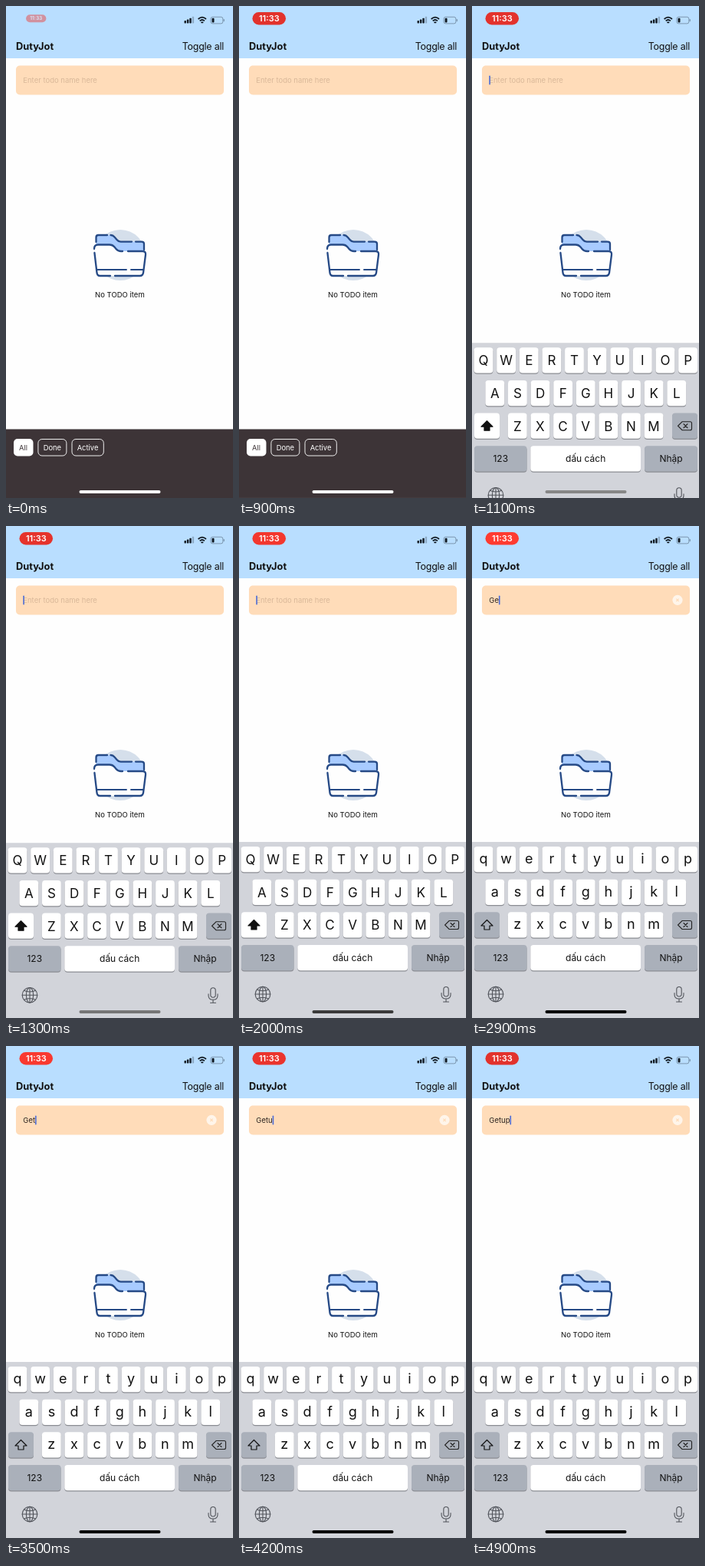
An HTML page that plays this animation: 296 by 640 pixels, repeating every 5000 ms.

```html
<!DOCTYPE html>
<html lang="en">
<head>
<meta charset="utf-8">
<title>Todo list</title>
<style>
  html, body { margin: 0; width: 100%; height: 100%; overflow: hidden; background: #fefefe; }
  svg { display: block; width: 296px; height: 640px; }
  text { font-family: Inter, Roboto, sans-serif; fill: #111; }
  .small { font-size: 9.5px; }
  .tab { font-size: 9.4px; text-anchor: middle; fill: #fff; }
  .mid { text-anchor: middle; }
  .ink { fill: none; stroke: #264a86; stroke-width: 2.3; stroke-linecap: round; stroke-linejoin: round; }
  .line { fill: none; stroke: #50535a; stroke-width: 1.1; stroke-linecap: round; }
</style>
</head>
<body>
<svg viewBox="0 0 296 640">
  <rect width="296" height="640" fill="#fefefe"/>
  <rect width="296" height="68" fill="#b9deff"/>

  <!-- status bar -->
  <g id="pill">
    <rect id="pillBox" x="17.5" y="8" width="43.5" height="16.5" rx="8.2"/>
    <text x="39.3" y="20" class="mid" font-size="11" font-weight="600" style="fill:#fff">11:33</text>
  </g>
  <g fill="#101820">
    <rect x="232.5" y="19" width="2.4" height="3.5" rx=".7"/>
    <rect x="235.9" y="17.5" width="2.4" height="5" rx=".7"/>
    <rect x="239.3" y="15.8" width="2.4" height="6.7" rx=".7"/>
    <rect x="242.7" y="13.8" width="2.4" height="8.7" rx=".7" opacity=".25"/>
    <rect x="268.5" y="15.8" width="3" height="5.6" rx="1"/>
    <rect x="283.6" y="17" width="1.2" height="3.2" rx=".6" opacity=".4"/>
  </g>
  <rect x="267" y="14.3" width="15.8" height="8.6" rx="2.4" fill="none" stroke="#101820" stroke-opacity=".4" stroke-width=".9"/>
  <g fill="none" stroke="#101820" stroke-width="1.7">
    <path d="M250.6 17q5.2-4.6 10.4 0M252.7 19.3q3.1-2.6 6.2 0"/>
    <path d="M255 21.3h1.6" stroke-linecap="round"/>
  </g>

  <!-- header and input -->
  <text x="13" y="56.5" font-size="12.8" font-weight="700">DutyJot</text>
  <text x="284" y="56.5" font-size="12.4" letter-spacing="-.2" text-anchor="end">Toggle all</text>
  <rect x="13" y="77.5" width="271" height="38" rx="5" fill="#ffdcb9"/>
  <text id="hint" class="small" x="22.3" y="100" style="fill:#d9b899">Enter todo name here</text>
  <text id="typed" class="small" x="22.3" y="100" style="fill:#2b2420"></text>
  <rect id="caret" y="90.5" width="1.6" height="12" rx=".8" fill="#4b6bd6"/>
  <g id="clear">
    <circle cx="268" cy="96.3" r="6.6" fill="#fff5ea"/>
    <path d="M266.3 94.6l3.4 3.4m0-3.4l-3.4 3.4" stroke="#ffdcb9" stroke-width="1.2"/>
  </g>

  <!-- empty folder -->
  <circle cx="149" cy="324" r="33" fill="#d5dfeb"/>
  <path d="M117.5 312V301q0-3 3-3h16q3 0 5 2.5l3 3.5q2 2.6 5 2.6h27.500q3 0 3 3V320H150z" fill="#a8cbff"/>
  <path d="M115 316q0-5.500 5-5.500h15q4 0 6.500 3l2 2.500q2.500 3 6.500 3h28q4.500 0 4 4.500l-3 23.500q-.6 4-4.500 4H122.500q-3.500 0-4-4z" fill="#fefefe"/>
  <g class="ink">
    <path d="M117.500 307V301q0-3 3-3H132M136.500 298q3 0 5 2.500l3 3.500q2 2.600 5 2.600H164M169 306.600h8q3 0 3 3V317"/>
    <path d="M115 316q0-5.500 5-5.500h15q4 0 6.500 3l2 2.500q2.500 3 6.500 3H152M159 319h19q4.500 0 4 4.500l-3 23.500q-.6 4-4.500 4H142M136 351H122.500q-3.500 0-4-4L115.400 321"/>
    <path d="M119 343H157M163 343H179" stroke-width="1.900"/>
  </g>
  <text class="small mid" x="148.400" y="379">No TODO item</text>

  <!-- filter bar -->
  <rect y="550.5" width="296" height="90" fill="#3d3437"/>
  <rect x="10" y="563" width="25.500" height="22.500" rx="5" fill="#fff"/>
  <rect x="41.900" y="563.500" width="37" height="21.500" rx="5" fill="none" stroke="#eee"/>
  <rect x="86" y="563.500" width="41.300" height="21.500" rx="5" fill="none" stroke="#eee"/>
  <text class="tab" x="22.600" y="577.700" style="fill:#3d3437">All</text>
  <text class="tab" x="60.400" y="577.700">Done</text>
  <text class="tab" x="106.500" y="577.700">Active</text>

  <g id="board">
    <rect y="411" width="296" height="260" fill="#d2d4da"/>
    <g id="keys"></g>
    <path id="shift" d="M19.500 512.500l7.500 7.500h-4v5h-7v-5h-4z" stroke="#111" stroke-width="1.200" stroke-linejoin="round"/>
    <g class="line" style="stroke:#222">
      <path d="M274 513.500h10.500q2 0 2 2v7q0 2-2 2H274l-5.500-5.500z"/>
      <path d="M276 516.500l5 5m0-5l-5 5"/>
    </g>
    <g class="line">
      <circle cx="31" cy="609" r="9.800"/>
      <ellipse cx="31" cy="609" rx="4.600" ry="9.800"/>
      <path d="M31 599.200v19.600M21.200 609h19.600M23.500 603q7.500 3.500 15 0M23.500 615q7.500-3.500 15 0"/>
      <rect x="266.800" y="599.500" width="6.400" height="12.500" rx="3.200"/>
      <path d="M264 607.500v2q0 5.500 6 5.500t6-5.500v-2M270 615v4M266.500 619h7"/>
    </g>
    <g id="bubble">
      <path fill="#fff"/>
      <text class="mid" font-size="26"></text>
    </g>
  </g>
  <rect id="home" x="95.500" y="630" width="106" height="4" rx="2"/>
</svg>
<script>
const LOOP = 5000, FOCUS = 900, HOLD = 100, PITCH = 29.62;
// time each letter lands in the field
const strokes = [['G', 2500], ['e', 2800], ['t', 3400], ['u', 4100], ['p', 4600]];
const $ = id => document.getElementById(id);
const clamp = v => Math.max(0, Math.min(1, v));
const mix = (a, b, k) => `rgb(${a.map((v, i) => Math.round(v + (b[i] - v) * k))})`;

function add(tag, attrs, content = '') {
  const el = document.createElementNS('http://www.w3.org/2000/svg', tag);
  for (const name in attrs) el.setAttribute(name, attrs[name]);
  el.textContent = content;
  return $('keys').appendChild(el);
}

function key(x, y, w, fill, label, size) {
  add('rect', { x, y: y + 1, width: w, height: 33.5, rx: 4, fill: '#8b8d93' });
  const face = add('rect', { x, y, width: w, height: 33.3, rx: 4, fill });
  const text = add('text', { x: x + w / 2, y: y + 21, class: 'mid', 'font-size': size }, label);
  return { face, text, x: x + w / 2, y };
}

const GREY = '#aab0ba', letters = {};
[['qwertyuiop', 15, 417], ['asdfghjkl', 29.8, 459.7], ['zxcvbnm', 59.3, 502.3]].forEach(([row, x, y]) =>
  [...row].forEach((c, i) => letters[c] = key(x + i * PITCH - 12.4, y, 24.8, '#fff', c, 18)));
const shiftKey = key(3, 502.3, 33, GREY, '', 12);
key(261, 502.3, 33, GREY, '', 12);
key(3, 545, 68.5, GREY, '123', 12);
key(76.3, 545, 143.7, '#fff', 'dấu cách', 12);
key(225, 545, 69, GREY, 'Nhập', 12);

function setCase(upper) {
  for (const c in letters) {
    const { text, y } = letters[c];
    text.textContent = upper ? c.toUpperCase() : c;
    text.setAttribute('font-size', upper ? 17 : 18);
    text.setAttribute('y', y + (upper ? 23 : 22));
  }
  shiftKey.face.setAttribute('fill', upper ? '#fff' : GREY);
  $('shift').setAttribute('fill', upper ? '#111' : 'none');
}

function showBubble(stroke) {
  $('bubble').style.display = stroke ? '' : 'none';
  if (!stroke) return;
  const { x, y } = letters[stroke[0].toLowerCase()];
  const l = x - 12.4, r = x + 12.4;
  const right = Math.min(x + 20, 294), left = right - 40;
  const [shape, text] = $('bubble').children;
  shape.setAttribute('d', `M${l} ${y + 29}V${y + 6}C${l} ${y - 3} ${left} ${y - 2} ${left} ${y - 12}
    V${y - 38}q0-7 7-7H${right - 7}q7 0 7 7V${y - 12}C${right} ${y - 2} ${r} ${y - 3} ${r} ${y + 6}
    V${y + 29}q0 4-4 4H${l + 4}q-4 0-4-4z`);
  text.setAttribute('x', (left + right) / 2);
  text.setAttribute('y', y - 13);
  text.textContent = stroke[0];
}

let wasUpper = null;
function draw(t) {
  const grow = 1 - (1 - clamp(t / 300)) ** 3;
  $('pill').setAttribute('transform', `translate(39.2 16.2) scale(${.6 + .4 * grow}) translate(-39.2 -16.2)`);
  $('pill').setAttribute('opacity', .45 + .55 * grow);
  const pulse = .5 - .5 * Math.cos((t - 900) / 4000 * 2 * Math.PI);
  $('pillBox').setAttribute('fill', mix([226, 50, 44], [255, 59, 48], pulse));

  // critically damped slide
  const s = Math.max(0, t - FOCUS) / 1000 * 18.26;
  $('board').setAttribute('transform', `translate(0 ${229 * (1 + s) * Math.exp(-s)})`);
  $('board').style.display = t > FOCUS ? '' : 'none';
  const shade = t <= FOCUS ? 255 : t < 1100 ? 255 - (t - FOCUS) * .6 : Math.max(0, 135 - (t - 1100) * .085);
  $('home').setAttribute('fill', mix([0, 0, 0], [255, 255, 255], shade / 255));

  const done = strokes.filter(k => t >= k[1]);
  $('typed').textContent = done.map(k => k[0]).join('');
  $('hint').style.display = done.length ? 'none' : '';
  $('clear').style.display = done.length ? '' : 'none';
  if (wasUpper !== !done.length) setCase(wasUpper = !done.length);
  showBubble(strokes.find(k => t >= k[1] - HOLD && t < k[1]));

  const since = t - (done.length ? done[done.length - 1][1] : 1000);
  const phase = since % 1000;
  const glow = phase < 500 ? 1 : Math.max(clamp((650 - phase) / 150), clamp((phase - 850) / 150));
  $('caret').setAttribute('x', 22.3 + (done.length ? $('typed').getComputedTextLength() : 0));
  $('caret').setAttribute('opacity', since < 0 ? 0 : glow);
}

const start = performance.now();
function tick() {
  draw((performance.now() - start) % LOOP);
  requestAnimationFrame(tick);
}
tick();
</script>
</body>
</html>
```
